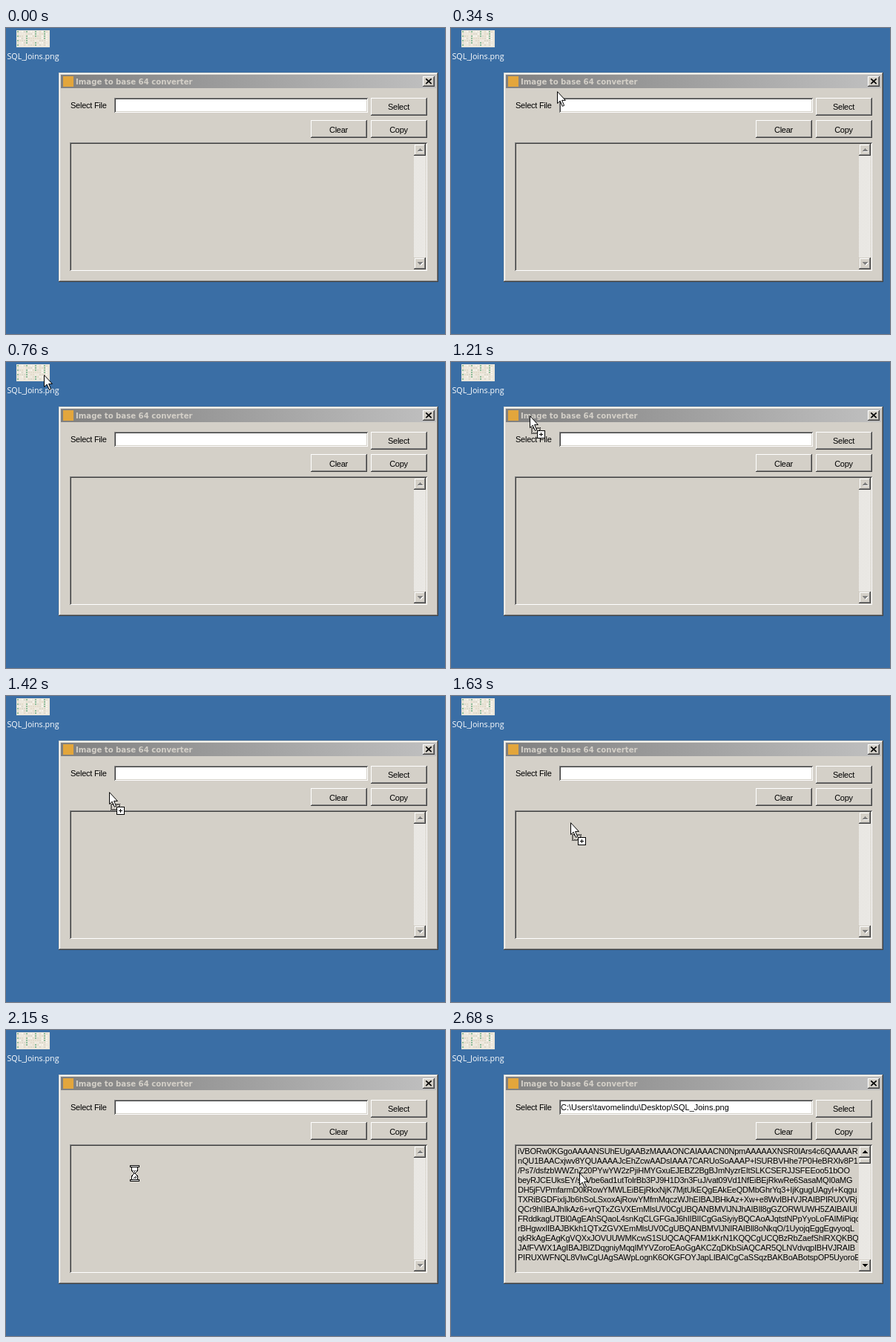
Animation, 592 px wide and 412 px high, one loop 3140 ms. Source, as an HTML page:

```html
<!DOCTYPE html>
<html lang="en">
<head>
<meta charset="utf-8">
<title>Image to base 64 converter</title>
<style>
html, body { margin: 0; width: 100%; height: 100%; overflow: hidden; background: #3a6ea5; }
div { position: absolute; box-sizing: border-box; }
svg { position: absolute; left: 0; top: 0; }
.face { background: #d4d0c8; }
.raised { background: #d4d0c8; box-shadow: inset -1px -1px #404040, inset 1px 1px #fff, inset -2px -2px #808080; }
.frame { background: #d4d0c8; box-shadow: inset -1px -1px #404040, inset 1px 1px #d4d0c8, inset -2px -2px #808080, inset 2px 2px #fff; }
.sunken { box-shadow: inset 1px 1px #808080, inset -1px -1px #fff, inset 2px 2px #404040, inset -2px -2px #d4d0c8; }
#bar { left: 74px; top: 63px; width: 506px; height: 18px; background: linear-gradient(90deg, #808080, #c0c0c0); }
#track { left: 550px; top: 156px; width: 16px; height: 169px;
  background: repeating-conic-gradient(#fff 0 25%, #d4d0c8 0 50%) 0 0 / 2px 2px; }
text { font: 11px "Liberation Sans", Arial, sans-serif; white-space: pre; letter-spacing: -.25px; }
.mid { text-anchor: middle; }
#path { letter-spacing: 0; }
#code text { letter-spacing: -.22px; }
#name { font: 10.7px "Open Sans", "Noto Sans", sans-serif; letter-spacing: 0; fill: #fff; }
#title { font: bold 10.15px "DejaVu Sans", sans-serif; letter-spacing: 0; fill: #d4d0c8; }
.crisp { shape-rendering: crispEdges; }
</style>
</head>
<body>
<div class="frame" style="left:71px;top:60px;width:512px;height:282px"></div>
<div id="bar"></div>
<div class="raised" style="left:562px;top:65px;width:16px;height:14px"></div>
<div class="sunken" style="left:146px;top:94px;width:342px;height:20px;background:#fff"></div>
<div class="raised" style="left:492px;top:94px;width:76px;height:24px"></div>
<div class="raised" style="left:411px;top:124px;width:76px;height:24px"></div>
<div class="raised" style="left:492px;top:124px;width:76px;height:24px"></div>
<div class="sunken face" style="left:86px;top:154px;width:482px;height:173px"></div>
<div id="track"></div>
<div class="frame" style="left:550px;top:156px;width:16px;height:16px"></div>
<div class="frame" style="left:550px;top:309px;width:16px;height:16px"></div>
<div class="frame" id="thumb" style="left:550px;top:172px;width:16px;height:8px"></div>

<svg width="592" height="412" viewBox="0 0 592 412">
  <defs>
    <pattern id="dots" width="2" height="2" patternUnits="userSpaceOnUse">
      <path d="M0 0h1v1h-1zM1 1h1v1h-1z" class="crisp"/>
    </pattern>
    <clipPath id="clip"><path d="M88 156H549V325H88Z"/></clipPath>
    <path id="up" d="M558 162h1v1h1v1h1v1h1v1h-7v-1h1v-1h1v-1h1z"/>
    <path id="down" d="M555 315h7v1h-1v1h-1v1h-1v1h-1v-1h-1v-1h-1v-1h-1z"/>
  </defs>

  <g id="picture" class="crisp"><path d="M14 3H59V26H14Z" fill="#ebe6da"/></g>
  <text id="name" x="1.5" y="42">SQL_Joins.png</text>

  <rect x="77" y="65" width="14" height="14" fill="#e3a63c"/>
  <text id="title" x="94" y="76">Image to base 64 converter</text>
  <path d="M566.3 68.3L573.7 75.2M573.7 68.3L566.3 75.2" stroke="#000" stroke-width="1.7"/>

  <text x="87" y="108">Select File</text>
  <text x="529.5" y="110" class="mid">Select</text>
  <text x="448.5" y="141" class="mid">Clear</text>
  <text x="529.5" y="141" class="mid">Copy</text>

  <g class="crisp" id="idle">
    <g fill="#fff" transform="translate(1 1)"><use href="#up"/><use href="#down"/></g>
    <g fill="#808080"><use href="#up"/><use href="#down"/></g>
  </g>
  <g id="result">
    <g class="crisp"><use href="#up"/><use href="#down"/></g>
    <text id="path" x="148" y="108">C:\Users\tavomelindu\Desktop\SQL_Joins.png</text>
    <g id="code" clip-path="url(#clip)"></g>
  </g>

  <g id="wait" class="crisp" transform="translate(167 182)">
    <path d="M2 3H11V7L8 11L11 15V19H2V15L5 11L2 7Z" fill="#fff"/>
    <path d="M2.5 3V7L5.5 10.5V11.5L2.5 15V19M10.5 3V7L7.5 10.5V11.5L10.5 15V19" fill="none" stroke="#000"/>
    <path d="M4 7H9L7 10V12H6V10ZM4 18V17L6 15H7L9 17V18Z" fill="url(#dots)"/>
    <path d="M.5 .5H12.5V2.5H.5ZM.5 19.5H12.5V21.5H.5Z" fill="#fff" stroke="#000"/>
  </g>
  <g id="cursor">
    <g id="drag" class="crisp">
      <path d="M3 17H14V24H3Z" fill="none" stroke="url(#dots)" stroke-width="2"/>
      <g id="plus">
        <path d="M10.5 20.5h10v10h-10z" fill="#fff" stroke="#000"/>
        <path d="M13 25h5v1h-5zM15 23h1v5h-1z"/>
      </g>
    </g>
    <path d="M.5 .7V16.6L4.2 13.2L7.3 20.3L9.6 19.3L6.6 12.4H11.4Z" fill="#fff" stroke="#000"/>
  </g>
</svg>

<script>
const LOOP = 3140, DRAG = 990, WAIT = 2150, DONE = 2680;
// Pointer stops: time, x, y
const stops = [
  [130, 384, 247], [200, 298, 190], [270, 215, 135], [340, 143, 85],
  [410, 105, 56], [480, 80, 36], [550, 63, 23], [620, 54, 17], [690, 52, 17], [760, 51, 17],
  [990, 56, 20], [1060, 68, 31], [1140, 87, 51], [1210, 106, 72],
  [1280, 118, 92], [1350, 129, 112], [1420, 139, 129], [1490, 148, 145],
  [1560, 155, 158], [1630, 161, 170], [1700, 167, 180], [1780, 171, 187], [1850, 173, 192]
];
const output = [
  "iVBORw0KGgoAAAANSUhEUgAABzMAAAONCAIAAACN0NpmAAAAAXNSR0IArs4c6QAAAAR",
  "nQU1BAACxjwv8YQUAAAAJcEhZcwAADsIAAA7CARUoSoAAAP+lSURBVHhe7P0HeBRXlv8P1",
  "/Ps7/dsfzbWWZnZ20PYwYW2zPjiHMYGxuEJEBZ2BgBJmNyzrEItSLKCSERJJSFEEoo51bOO",
  "beyRJCEUksEY/s+Vbe6ad1utTolrBb3PJ9H1D3n3FuJ/vat09Vd1NfEiBEjRkwRe6SasaMQI0aMG",
  "DH5jFVPmfarmD0kRowYMWLEiBEjRkxNjK7MjtUkEQgEAkEeQDMbGhrYq3+IjKgugUAgyI+Kqgu",
  "TXRiBGDFixIjJb6hSoLSxoxAjRowYMfmMqczWJhEIBAJBHkAz+Xw+e8WvIBHVJRAIBPIRUXVRj",
  "QCr9hIIBAJhIkAz6+vrQTxZGVXEmMlsUV0CgUBQANBMVlJNJhAIBIl8gGZORWUWH5ZAIBAIUl",
  "FRddkagUTBl0AgEAhSQaoL4snKqCLGFGaJ6hIIBIICgGaSiyiyBQCAoAJqtstNPpYyoLoFAIMiPiqor",
  "rBHgwxIIBAJBKkh1QTxZGVXEmMlsUV0CgUBQANBMVlJNIRAIBIl8oNkqO/1UyojqEggEgvyoqL",
  "qkRkAgEAgKgVQXxJOVUUWMKcwS1SUQCAQFAM1kKrN1KQQCgUCQBzRbZaefShlRXQKBQ",
  "JAfFVWX1AgIBAJBIZDqgniyMqqIMYVZoroEAoGgAKCZqDKbSiAQCAR5QLNVdvqpIBHVJRAIB",
  "PIRUXWFNQL8VlwCgUAgSAWpLognK6OKGFOYJapLIBAICgCaSSqzBAKBoABotspOP5UyoroE"
];

const $ = id => document.getElementById(id);
const show = (id, on) => { $(id).style.display = on ? "" : "none"; };

function add(parent, tag, attrs) {
  const el = document.createElementNS("http://www.w3.org/2000/svg", tag);
  for (const key in attrs) el.setAttribute(key, attrs[key]);
  return parent.appendChild(el);
}

output.forEach((line, i) => {
  add($("code"), "text", { x: 90, y: 167 + 13 * i }).textContent = line;
});

// Thumbnail: a small diagram of pale cells and green marks
let seed = 7;
const rand = () => (seed = seed * 16807 % 2147483647) / 2147483647;
for (let x = 15; x < 57; x += 3) {
  for (let y = 4; y < 25; y += 3) {
    const green = (x - 15) % 12 === 0 && rand() < .7;
    const fill = green ? "#8fbd9b" : ["#f8f5ee", "#e4dccb", "#f0ebe2", "#dcd9cc"][rand() * 4 | 0];
    add($("picture"), "rect", { x, y, width: 2, height: 2, fill });
  }
}

function draw(t) {
  const done = t >= DONE, waiting = t >= WAIT && !done;
  const stop = stops.filter(s => s[0] <= t).pop();
  const dragging = t >= DRAG && t < WAIT;
  for (const id of ["result", "thumb"]) show(id, done);
  show("idle", !done);
  show("wait", waiting);
  show("cursor", stop && !waiting);
  show("drag", dragging);
  if (!stop) return;
  show("plus", stop[2] > 60);
  $("cursor").setAttribute("transform", `translate(${stop[1]} ${stop[2]})`);
}

function tick() {
  draw(performance.now() % LOOP);
  requestAnimationFrame(tick);
}
draw(0);
tick();
</script>
</body>
</html>
```
